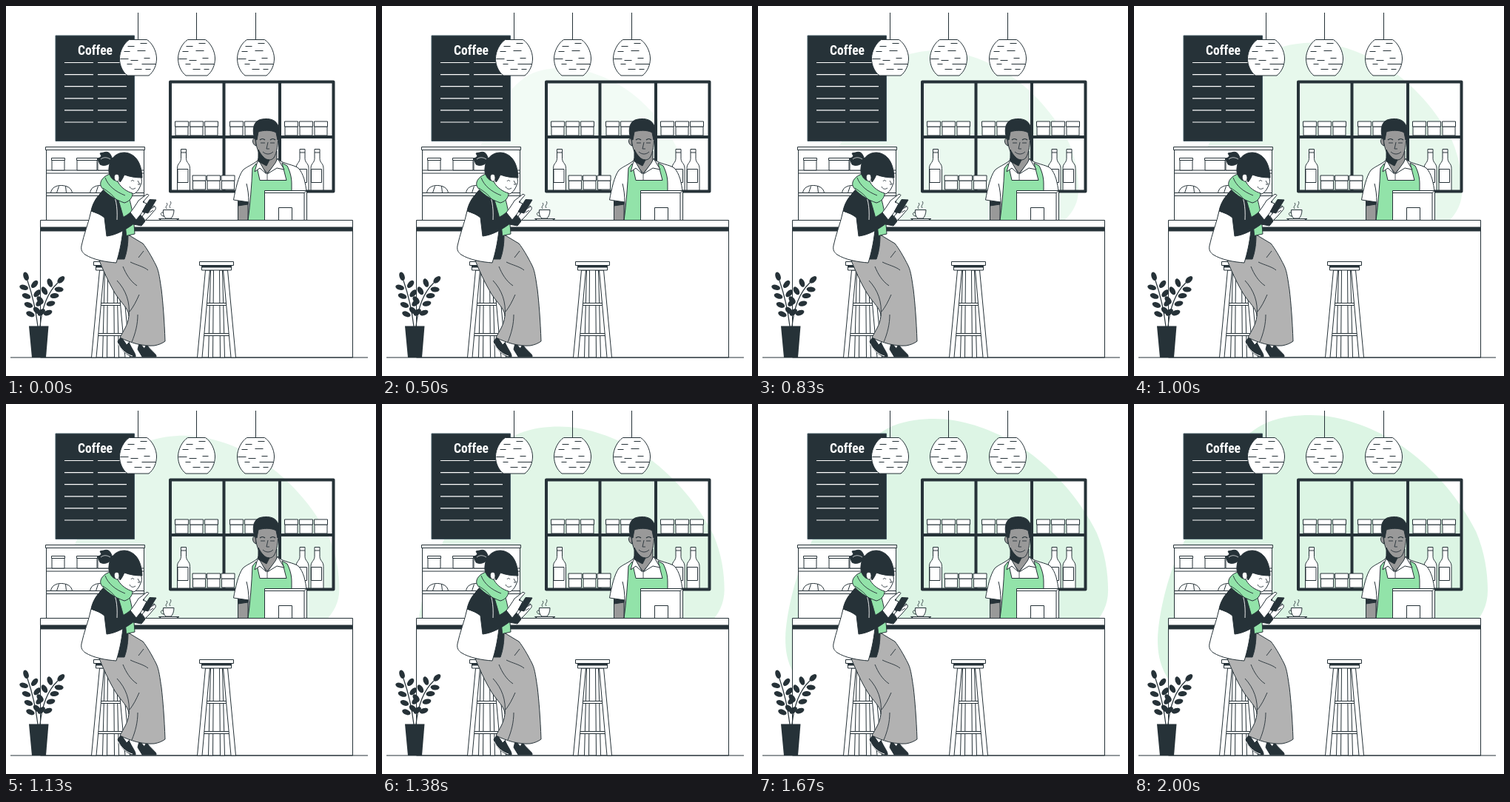
Recreate the animation shown at these times as an HTML page with a canvas. Size 500x500 px, loop 2040 ms.

```html
<!DOCTYPE html>
<html lang="en">
<head>
<meta charset="utf-8">
<title>Coffee bar</title>
<style>
html, body { margin: 0; width: 100%; height: 100%; overflow: hidden; background: #fff; }
canvas { display: block; width: 500px; height: 500px; }
</style>
</head>
<body>
<canvas id="stage"></canvas>
<script>
const canvas = document.getElementById('stage');
const ctx = canvas.getContext('2d');
const DPR = window.devicePixelRatio || 1;
canvas.width = canvas.height = 500 * DPR;

const INK = '#263238', WHITE = '#fff', GREEN = '#92e3a9';
const SKIN = '#999', CLOTH = '#b2b2b2', TINT = '#dcf5e4';
const LOOP = 2040, STEP = 125 / 3, GROW = 2000;

function shape(d, fill, line = INK, width = 1) {
  const p = new Path2D(d);
  if (fill) { ctx.fillStyle = fill; ctx.fill(p); }
  if (line) { ctx.strokeStyle = line; ctx.lineWidth = width; ctx.stroke(p); }
}
const stroke = (d, line = INK, width = 1) => shape(d, null, line, width);
function box(x, y, w, h, fill = WHITE, line = INK) {
  shape(`M${x} ${y}h${w}v${h}h${-w}z`, fill, line);
}
function at(x, y, draw) {
  ctx.save();
  ctx.translate(x, y);
  draw();
  ctx.restore();
}

// Ease-out, the same as cubic-bezier(0, 0, .58, 1)
function easeOut(x) {
  if (x >= 1) return 1;
  let lo = 0, hi = 1;
  for (let i = 0; i < 24; i++) {
    const u = (lo + hi) / 2;
    if (1.74 * (1 - u) * u * u + u * u * u < x) lo = u; else hi = u;
  }
  return 3 * (1 - lo) * lo * lo + lo * lo * lo;
}

function blob(t) {
  if (t < 499) return;
  const p = easeOut(t / GROW), s = 0.5 + p / 2;
  ctx.save();
  ctx.globalAlpha = p;
  ctx.translate(258, 236);
  ctx.scale(s, s);
  ctx.translate(-258, -236);
  shape('M238 15C275 15 312 28 345 46C400 78 440 128 462 172C474 200 478 228 478 252' +
    'C478 272 470 288 455 303C400 400 80 440 44 368C34 350 32 335 32 318' +
    'C33 285 45 235 60 202C74 172 88 146 100 120C120 75 146 40 180 25C200 17 220 15 238 15z', TINT, null);
  ctx.restore();
}

function jar(x, y, w = 18) {
  box(x + 0.5, y + 7, w - 1, 12);
  box(x, y, w, 7);
}

function bottle(x) {
  at(x, 193.5, () => {
    shape('M-3.5 0h7v13C4 19 8.5 19 8.5 26V55.5H-8.500V26C-8.500 19 -4 19 -3.5 13z', WHITE);
    stroke('M-3.5 4.5h7');
    box(-8, 27, 14, 18);
  });
}

function shelf() {
  stroke('M222 102.5H442.5V250.5H222zM294.5 102V250M370 102V250M222 177H442', INK, 4);
  for (const x of [228.5, 302.5, 376.5])
    for (let i = 0; i < 3; i++) jar(x + i * 20, 156);
  for (let i = 0; i < 3; i++) jar(252 + i * 19.5, 229);
  [240, 400.5, 420.5].forEach(bottle);
}

function board() {
  box(67, 40, 106.5, 142.5, INK, '#455a64');
  let lines = '';
  for (let y = 76.5; y < 160; y += 16.1) lines += `M79 ${y}H118M124 ${y}H163`;
  stroke(lines, WHITE, 1.2);
  const face = 'px "Roboto Condensed", "Liberation Sans Narrow", Roboto, sans-serif';
  ctx.font = '600 condensed 21' + face;
  const size = Math.min(21, 21 * 47 / ctx.measureText('Coffee').width);
  ctx.font = '600 condensed ' + size + face;
  ctx.textAlign = 'center';
  ctx.fillStyle = WHITE;
  ctx.fillText('Coffee', 120.5, 66);
}

function lamp(x) {
  at(x, 0, () => {
    stroke('M0 9V46');
    shape('M-12 45.5H12C19 50 25 61 25 71C25 80 21 89 14.500 94H-14.500C-21 89 -25 80 -25 71C-25 61 -19 50 -12 45.5z', WHITE);
    stroke('M3 50.5H12M-14 54.500H-5M-1 60.5H10M-19 61.500H-11M-24 71.500H-13M-10 73.500H0M8 70.500H16' +
      'M5 78.500H24M-15 78.500H-8M-5 85.500H5M10 85.500H17', INK, 1.1);
  });
}

function pastryCase() {
  box(54.5, 191.5, 132, 98);
  box(53.5, 190.5, 134, 4);
  box(54.5, 222, 132, 4);
  box(54.5, 252.5, 132, 4);
  for (const [x, w] of [[61.5, 18], [95.5, 28], [123.5, 26]]) {
    box(x + 0.5, 208.5, w - 1, 13.5);
    box(x, 205.5, w, 3);
  }
  for (const x of [60.5, 113.5])
    shape(`M${x} 252.500c1 -7 7 -10 14 -10s14 3 15 10zm8 0l3 -9m10 9l-1 -9`, WHITE);
}

function barista() {
  // Arm and shirt
  shape('M313.500 262H327V290H313.500z', SKIN);
  shape('M313.500 264H327V268L313.500 270z', INK);
  shape('M341 208C333 215 325 217 320 222C314 230 310 248 307.500 262L328 265V290H398L398 251H406' +
    'C405 240 402 226 395 219C388 214 376 214 367 207z', WHITE);
  stroke('M325 240C327 248 328 256 328 265');
  // Neck and apron
  shape('M342 192L341 212L353 226L366 211V196z', SKIN);
  shape('M338 213L343 235.500H379L373 212L380 216C384 224 386 232 386 240V290H327C330 268 332 242 333 219z', GREEN);
  shape('M341 206L336 224L343 219L352 227L344 213z', WHITE);
  shape('M367 206L376 221L366 219L353 227L364 212z', WHITE);
  stroke('M353 227V235', INK, 0.8);
  // Head
  shape('M337 180C332 177 332 187 338 189z', SKIN);
  shape('M337 170C337 186 339 196 345 203C349 209 358 210 362 205C366 199 368 187 368 170C361 162 345 162 337 170z', SKIN);
  shape('M341 194V210L352 216L356 208C350 208 345 202 341 194z', INK);
  shape('M337 180L334.500 173C333 160 338 154 346 153C356 151 366 154 368 163C370 169 369 175 367 181L365 171C358 167 347 168 341 170L339 181z', INK);
  stroke('M343 181C345 179 348 179 350 181M357 181C359 179 362 179 364 181', INK, 1.2);
  stroke('M344 185H350M357 185H363M354 184L352 193H356M347 197C351 201 357 201 361 197', INK, 0.9);
}

function register() {
  shape('M349.500 249.500H406.500V290H349.500z', WHITE);
  stroke('M349.500 252.500H403V290M403 252.500L406.500 249.500');
  box(368.5, 272.5, 18, 17);
}

function counter() {
  box(46.5, 299.5, 422, 175.5);
  box(46.5, 289.5, 422, 10);
  box(47, 299, 421, 5, INK);
}

function cup() {
  shape('M213 279C208 278 208 284 214 284', null);
  shape('M212.500 275.500H227C227 281 225 285 223 287H216C213 285 212 280 212.500 275.500z', WHITE);
  shape('M206.500 287.500H234L230 289.500H210z', WHITE);
  stroke('M217 274C214 270 220 270 217 266M222 273C219 269 225 268 222 264', INK, 0.9);
}

function stool(x) {
  at(x, 0, () => {
    shape('M-8 357L-11 475H-5L-4 357zM4 357L5 475H11L8 357z', WHITE);
    box(-17, 401.5, 34, 3);
    box(-21, 442.500, 42, 3);
    shape('M-15 357L-26 475H-19.500L-9 357zM9 357L19.500 475H26L15 357z', WHITE);
    box(-20, 351.5, 40, 5.5);
    box(-20, 351, 40, 2, INK);
    box(-23, 345.500, 46, 5);
  });
}

function leaf(x, y, angle, far) {
  ctx.fillStyle = INK;
  ctx.beginPath();
  ctx.ellipse(x + far * Math.cos(angle), y + far * Math.sin(angle), 6, 3.5, angle, 0, 7);
  ctx.fill();
}

// Stem as a quadratic curve with pairs of leaves
function sprig(x0, y0, cx, cy, x1, y1) {
  stroke(`M${x0} ${y0}Q${cx} ${cy} ${x1} ${y1}`, INK, 1.2);
  const mix = (a, b, c, u) => (1 - u) * (1 - u) * a + 2 * u * (1 - u) * b + u * u * c;
  const slope = (a, b, c, u) => (1 - u) * (b - a) + u * (c - b);
  for (let u = 0.2; u < 0.9; u += 0.2) {
    const x = mix(x0, cx, x1, u), y = mix(y0, cy, y1, u);
    const dir = Math.atan2(slope(y0, cy, y1, u), slope(x0, cx, x1, u));
    leaf(x, y, dir - 1, 9);
    leaf(x, y, dir + 1, 9);
  }
  leaf(x1, y1, Math.atan2(y1 - cy, x1 - cx), 6);
}

function plant() {
  sprig(43, 433, 39, 400, 29, 371);
  sprig(46, 433, 50, 393, 70, 374);
  shape('M31 432.500H57.500L54 475H35z', INK, null);
}

function woman() {
  // Shoes
  shape('M155 448L151 453C153 462 162 471 170 474H175C176 470 170 464 166 454z', INK);
  shape('M157 449L163 458L168 453z', WHITE);
  stroke('M151.500 456C155 464 163 471 171 473', WHITE);
  shape('M180 456L178 464L184 474H203C204 470 195 466 190 457z', INK);
  shape('M182 457L187 463L190 457z', WHITE);
  // Trousers
  shape('M126 344C133 361 143 383 152 395C159 404 166 411 166 419C165 431 158 440 154 448' +
    'C168 455 184 460 200 459C206 458 211 456 215 453C214 425 212 400 210 383' +
    'C208 371 207 359 203 351C197 339 190 327 185 321L165 309L150 343z', CLOTH);
  stroke('M166 419C168 400 162 384 150 371M180 390C176 399 172 407 167 413M168 346C176 350 186 352 192 357' +
    'M170 454C175 442 178 430 178 417M158 352C162 362 168 372 177 378M186 331L179 340', INK, 0.9);
  // Jacket
  shape('M131 249C122 259 117 270 114 283L131 322L150 342H160C164 331 165 320 165 309L158 256z', INK);
  // Scarf end
  shape('M150 256L166 258C170 271 173 290 174 308L162.500 310.500C162 294 156 276 150 256z', GREEN);
  // Bag
  shape('M115 277C112 292 105 309 102 324C101 330 103 333 107 336C118 343 135 346 149 347C153 334 156 321 158 303L136 298L134 284z', WHITE);
  // Sleeves
  shape('M174 285L181 281L188 291L183 297L172 295z', INK);
  shape('M131 250C123 257 117 266 115 277C122 279 128 282 133 286L136 311C148 310 163 302 177 291L168 279C162 284 156 287 151 288C154 279 153 268 148 257z', INK);
  stroke('M143 250C148 258 151 270 150 289', WHITE, 0.9);
  // Hands and phone
  shape('M168 279C172 274 176 268 179 263L190 254.500C193 254 194 256 191 258L185 265L190 267L184 279L176 289z', WHITE);
  shape('M184 284L190 277L200 270C203 271 203 275 200 277L194 284L188 290z', WHITE);
  shape('M184 278L194 261.500L203 262L192 280z', INK);
  stroke('M196 274L201 271M194 279L199 276', INK, 0.9);
  // Face
  shape('M146 224L182 228C183 234 184 237 183 239C181 246 178 251 173 254C168 254 164 252 160 249L149 240z', WHITE);
  // Scarf
  shape('M141 227C133 229 126 236 128 243C133 253 148 262 160 266C167 264 171 259 171 253C164 251 156 246 152 239L148 230z', GREEN);
  stroke('M134 232C138 243 148 251 161 256M131 246C138 251 143 254 148 261', INK, 0.9);
  // Hair
  shape('M143 205C141 198 137 196 132 198L127 199L129 203L124 207L127 214C132 217 139 215 143 210z', INK);
  shape('M139 224C138 209 147 198 160 198C174 199 183 210 184 232C176 232 168 231 160 228C158 232 157 235 154 238L152 232L147 236C142 233 140 229 139 224z', INK);
  stroke('M128 207C132 204 136 204 141 207', WHITE, 0.7);
  shape('M152 228C146 225 144 233 149 237C153 238 154 232 152 228z', WHITE);
  stroke('M169 237C170 235 172 235 173 237M167 244C169 248 172 248 175 246M178 236L181 241H178', INK, 0.9);
}

function scene(t) {
  ctx.setTransform(DPR, 0, 0, DPR, 0, 0);
  ctx.fillStyle = WHITE;
  ctx.fillRect(0, 0, 500, 500);
  ctx.lineJoin = 'round';
  blob(t);
  shelf();
  board();
  pastryCase();
  [178.5, 257.5, 337.5].forEach(lamp);
  barista();
  register();
  counter();
  cup();
  stroke('M6 475H489', INK, 1.1);
  stool(141.5);
  stool(284.5);
  plant();
  woman();
}

let shown = -1;
function tick() {
  const t = Math.floor(performance.now() % LOOP / 10) * 10;
  const step = Math.floor((t + 4.9) / STEP);
  if (step !== shown) scene(step * STEP);
  shown = step;
  requestAnimationFrame(tick);
}
tick();
</script>
</body>
</html>
```
